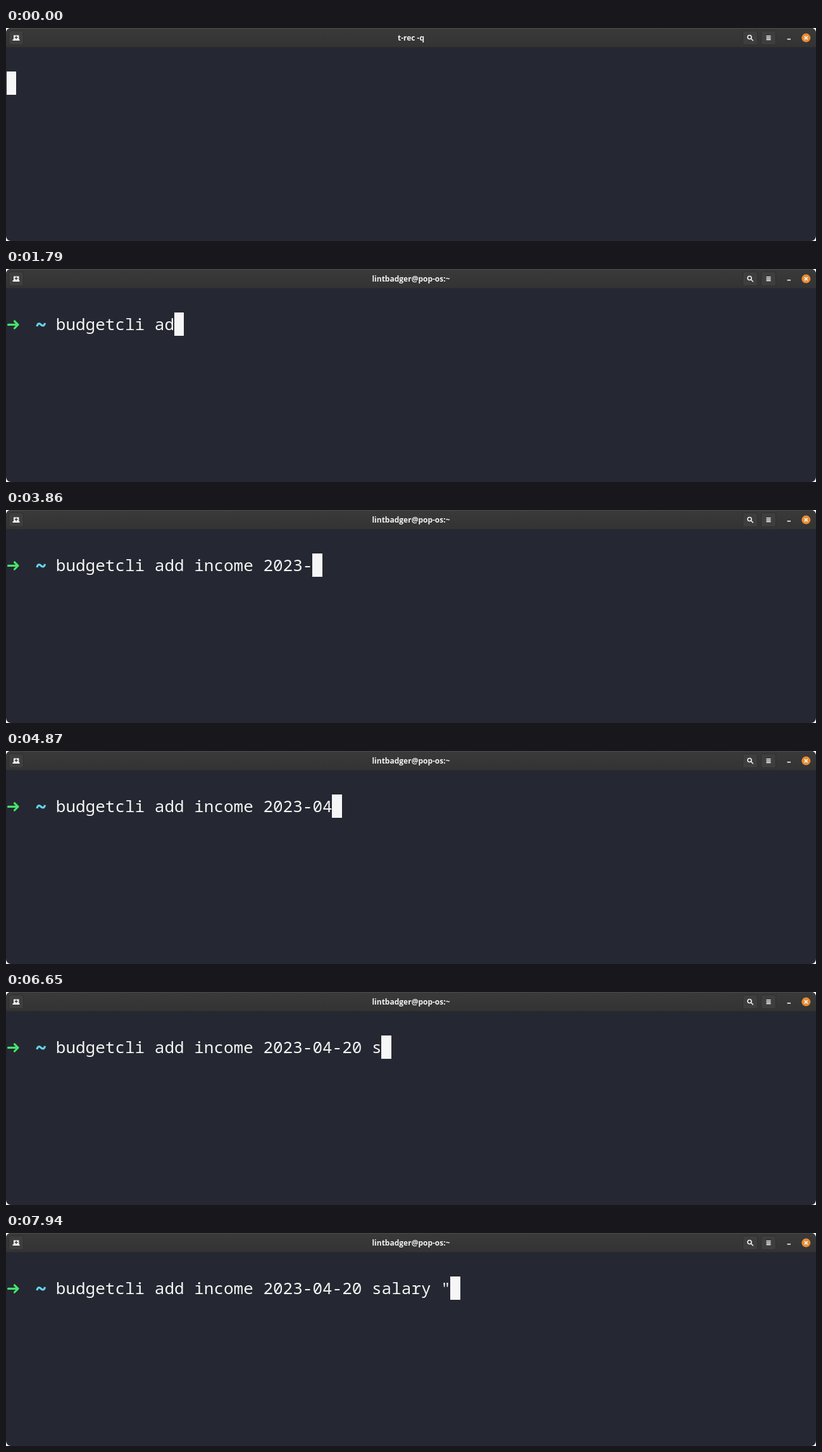
Write an HTML page that moves like this. It is 1280 by 338 pixels and loops after 8000 ms.

```html
<!DOCTYPE html>
<html lang="en">
<head>
<meta charset="utf-8">
<title>Terminal</title>
<style>
  html, body { margin: 0; width: 100%; height: 100%; overflow: hidden; background: #fff; }
  svg { display: block; width: 1280px; height: 338px; }
  .title { font: bold 12px "Open Sans", "Noto Sans", sans-serif; fill: #f2f2f2; text-anchor: middle; }
  .mono { font: 300 26px "Noto Sans Mono", monospace; fill: #f4f4f2; white-space: pre; }
  .button { fill: #3e3e3e; stroke: #2f2f2f; }
  .icon { fill: none; stroke: #f2f2f2; stroke-width: 1.6; }
  .sign { fill: none; stroke-width: 3.2; stroke-linejoin: round; }
</style>
</head>
<body>
<svg viewBox="0 0 1280 338">
  <defs>
    <linearGradient id="bar" x2="0" y2="1">
      <stop stop-color="#3a3a3a"/><stop offset="1" stop-color="#333"/>
    </linearGradient>
    <clipPath id="frame"><rect width="1280" height="338" rx="8"/></clipPath>
  </defs>
  <g clip-path="url(#frame)">
    <rect width="1280" height="338" fill="#252832"/>
    <rect width="1280" height="31" fill="url(#bar)"/>
    <path d="M0 .5H1280" stroke="#4b4b4b"/>
    <path d="M0 30.5H1280" stroke="#2c2c2e"/>

    <rect class="button" x="4.5" y="4.5" width="23" height="22" rx="3"/>
    <path d="M12 11.5h8.5v7H12zM10.5 18h11v2h-11z" fill="#f2f2f2"/>
    <path d="M16.2 12.500v5M13.700 15h5" stroke="#3e3e3e" stroke-width="1.400"/>

    <rect class="button" x="1164.5" y="4.5" width="23" height="22" rx="3"/>
    <circle class="icon" cx="1175" cy="14.5" r="3"/>
    <path class="icon" d="M1177.2 16.7l3.600 3.600"/>

    <rect class="button" x="1193.5" y="4.5" width="23" height="22" rx="3"/>
    <path class="icon" d="M1201.5 12.800h7M1201.5 15.600h7M1201.5 18.400h7"/>

    <path class="icon" d="M1234.5 17.700h5.500"/>
    <circle cx="1264.300" cy="15.600" r="7" fill="#e98d33"/>
    <path class="icon" d="M1261.800 13.100l5 5m0-5l-5 5" stroke-width="1.400"/>

    <text id="title" class="title" x="640" y="20"></text>
    <g id="prompt">
      <path class="sign" stroke="#46e56b" stroke-linecap="round" d="M3.500 88.400H18M13.500 82.800L19 88.400L13.500 94"/>
      <path class="sign" stroke="#63d5f0" d="M49 91C50 85.500 53 86 55.200 88.300S60.500 91 61.500 85.700"/>
      <text id="typed" class="mono" x="78.800" y="97"></text>
    </g>
    <rect id="cursor" y="69" height="37" fill="#f6f6f6"/>
  </g>
</svg>
<script>
  const LOOP = 8000, STEP = 256, LEAD = 10, CELL = 15.6, MARGIN = 0.8, PROMPT_CELLS = 5;
  const command = 'budgetcli add income 2023-04-20 salary "';
  // Characters typed after each step; -1 means the shell is still starting.
  const typedCounts = [
    -1, 0, 1, 3, 5, 8, 10, 12, 14, 16, 18, 20, 21, 23, 25, 26,
    26, 27, 27, 28, 29, 29, 30, 31, 31, 32, 33, 34, 36, 38, 39, 40
  ];
  const [title, prompt, typed, cursor] =
    ['title', 'prompt', 'typed', 'cursor'].map(id => document.getElementById(id));

  // Cell edges snap to whole pixels.
  const cellEdge = column => Math.max(1, Math.floor(MARGIN + column * CELL));

  function draw(time) {
    const count = typedCounts[Math.floor((time % LOOP + LEAD) / STEP)];
    const ready = count >= 0;
    const column = ready ? PROMPT_CELLS + count : 0;
    title.textContent = ready ? 'lintbadger@pop-os:~' : 't-rec -q';
    prompt.style.display = ready ? '' : 'none';
    typed.textContent = command.slice(0, Math.max(count, 0));
    cursor.setAttribute('x', cellEdge(column));
    cursor.setAttribute('width', cellEdge(column + 1) - cellEdge(column));
  }

  const start = performance.now();
  function tick() {
    draw(performance.now() - start);
    requestAnimationFrame(tick);
  }
  tick();
</script>
</body>
</html>
```
